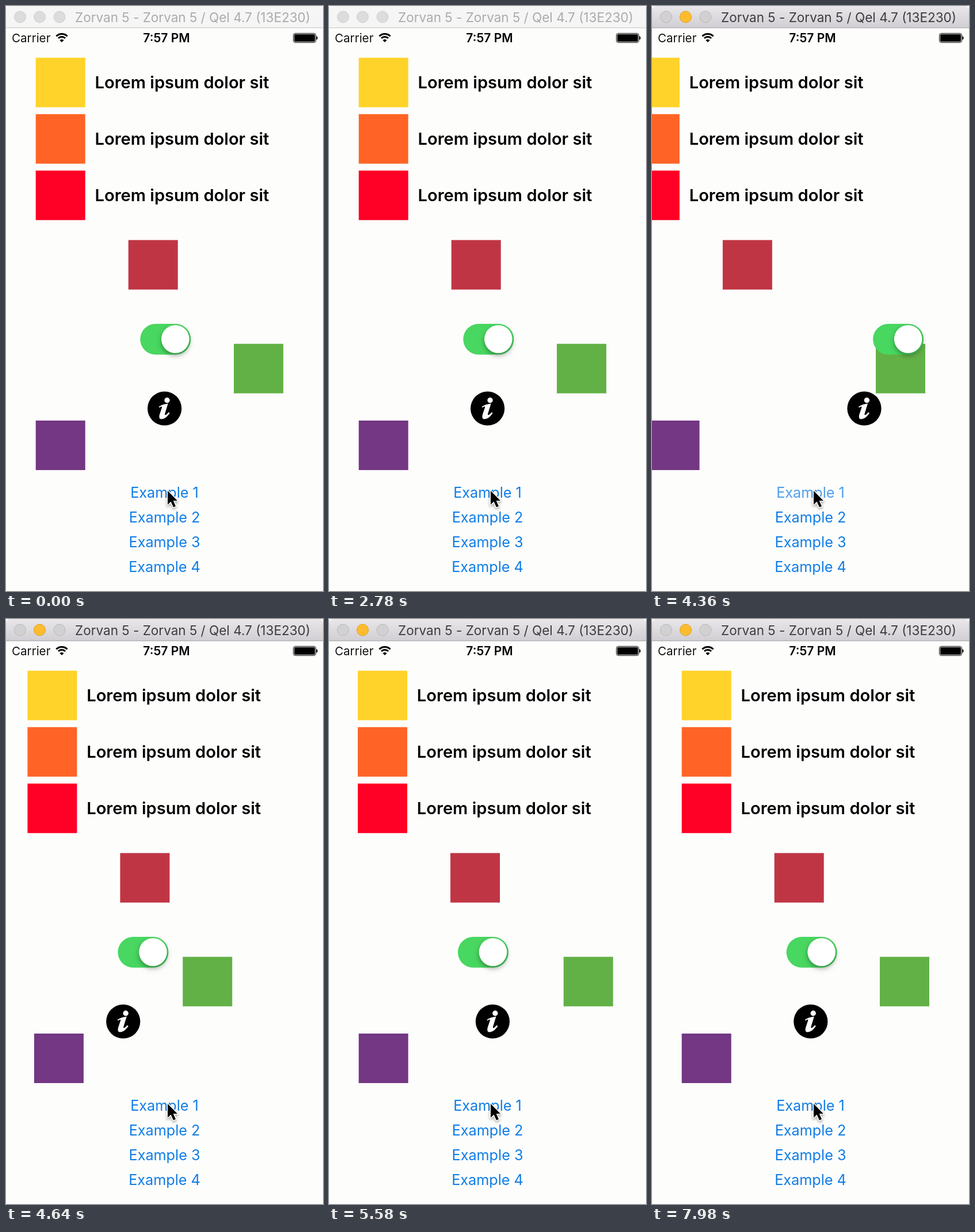
These frames come from a looping animation (551x1016 px, 8000 ms). An HTML page with a canvas:

```html
<!DOCTYPE html>
<html lang="en">
<head>
<meta charset="utf-8">
<style>
html, body { margin: 0; width: 100%; height: 100%; overflow: hidden; background: #fdfdfc; }
canvas { display: block; }
</style>
</head>
<body>
<canvas id="stage" width="551" height="1016"></canvas>
<script>
const ctx = document.getElementById('stage').getContext('2d');
const W = 551, H = 1016, LOOP = 8000;
const PRESS = 3750, RELEASE = 3890;
const FONT = 'Inter, "Open Sans", sans-serif';
const TAU = Math.PI * 2;

// Damped springs: start in ms, angular speed per second, damping ratio.
const springs = {
  rows: { start: 3892, speed: 6.06, damping: 0.5 },
  purple: { start: 3945, speed: 6.9, damping: 0.59 },
  green: { start: 3892, speed: 4.09, damping: 0.5 },
  toggle: { start: 3911, speed: 2.98, damping: 0.5 },
  info: { start: 3905, speed: 3.33, damping: 0.497 }
};

const clamp = v => Math.max(0, Math.min(1, v));
const smooth = v => v * v * (3 - 2 * v);

// Evenly spaced moments are shown for 20, 20 and 100 ms in turn.
function shownTime(t) {
  const u = t - 120;
  const cycle = Math.floor(u / 140);
  const rest = u - cycle * 140;
  const step = rest < 20 ? 0 : rest < 40 ? 1 : 2;
  return 120 + (cycle + step / 3) * 140;
}

function offset({ start, speed, damping }, t) {
  if (t < RELEASE) return 0;
  const a = Math.max(0, t - start) / 1000 * speed;
  const k = damping / Math.sqrt(1 - damping * damping);
  return W * Math.exp(-k * a) * (Math.cos(a) + k * Math.sin(a));
}

function text(str, x, y, size, color, weight = 400, align = 'left') {
  ctx.font = `${weight} ${size}px ${FONT}`;
  ctx.textAlign = align;
  ctx.fillStyle = color;
  ctx.fillText(str, x, y);
}

function disc(x, y, r, fill, stroke) {
  ctx.beginPath();
  ctx.arc(x, y, r, 0, TAU);
  ctx.fillStyle = fill;
  ctx.fill();
  if (stroke) {
    ctx.strokeStyle = stroke;
    ctx.lineWidth = 1;
    ctx.stroke();
  }
}

function pill(x, y, w, h, r) {
  ctx.beginPath();
  ctx.roundRect(x, y, w, h, r);
}

function square(x, y, color) {
  ctx.fillStyle = color;
  ctx.fillRect(x, y, 86, 86);
}

function shadow(color, blur, y) {
  ctx.shadowColor = color;
  ctx.shadowBlur = blur;
  ctx.shadowOffsetY = y;
}

function titleBar(active) {
  const fill = ctx.createLinearGradient(0, 0, 0, 37);
  fill.addColorStop(0, active ? '#e9e7ea' : '#f6f6f6');
  fill.addColorStop(1, active ? '#d1cfd3' : '#f5f5f5');
  ctx.fillStyle = fill;
  pill(0, 0, W, 38, [8, 8, 0, 0]);
  ctx.fill();
  ctx.fillStyle = active ? '#b3b1b5' : '#d5d5d5';
  ctx.fillRect(0, 37, W, 1.5);
  const idle = active ? ['#d2d1d2', '#b9b8b9'] : ['#dcdcdc', '#cecece'];
  [24.5, 58.5, 93].forEach((x, i) => {
    const [inside, edge] = active && i === 1 ? ['#fdbc2e', '#dfa023'] : idle;
    disc(x, 19, 10, inside, edge);
  });
  text('Zorvan 5 - Zorvan 5 / Qel 4.7 (13E230)', 324.5, 27.5, 22.5,
    active ? '#3d3c3e' : '#ababab', 400, 'center');
}

function statusBar() {
  text('Carrier', 10, 63, 20.6, '#111');
  text('7:57 PM', 279, 63, 21, '#000', 600, 'center');
  ctx.strokeStyle = '#000';
  ctx.lineWidth = 3;
  for (const r of [8.5, 13.5]) {
    ctx.beginPath();
    ctx.arc(97, 62, r, -Math.PI * 0.75, -Math.PI * 0.25);
    ctx.stroke();
  }
  ctx.fillStyle = '#000';
  ctx.beginPath();
  ctx.moveTo(97, 63);
  ctx.arc(97, 63, 5, -Math.PI * 0.75, -Math.PI * 0.25);
  ctx.fill();
  ctx.lineWidth = 1;
  pill(499.5, 47.5, 39, 16, 3.5);
  ctx.stroke();
  pill(501, 49, 36, 13, 2);
  ctx.fill();
  pill(539.5, 52.5, 2, 6, [0, 2, 2, 0]);
  ctx.fill();
}

function toggle(x) {
  ctx.fillStyle = '#48d760';
  pill(x, 552, 88, 53.5, 27);
  ctx.fill();
  ctx.save();
  shadow('rgba(0,0,0,.35)', 8, 4);
  disc(x + 61, 578.5, 24.3, '#fff');
  ctx.restore();
}

const letterI = new Path2D('M-10-3 C-6-6 0-8 6-8.5 L.5 9.5 C0 13 3.5 11 7 6.5 L9 8 ' +
  'C4.5 15-1 18.5-5.5 18.5 C-10 18.5-9.5 13.5-8.5 10 L-4.5-2 C-4-4.5-7-3-9-1.5Z');

function infoIcon(x) {
  ctx.save();
  ctx.translate(x, 699);
  disc(0, 0, 29.6, '#000');
  disc(4.4, -14.2, 4.7, '#fff');
  ctx.fill(letterI);
  ctx.restore();
}

function links(t) {
  const fade = t < PRESS ? 1 : t < RELEASE ? 0.2
    : 0.2 + 0.8 * smooth(clamp((t - RELEASE) / 850));
  for (let i = 1; i <= 4; i++) {
    ctx.globalAlpha = i === 1 ? fade : 1;
    text(`Example ${i}`, 275.5, 810.5 + 43 * i, 25.2, '#107de6', 400, 'center');
  }
  ctx.globalAlpha = 1;
}

function clickMark(t) {
  if (t < PRESS || t > 4140) return;
  const p = clamp((t - RELEASE) / 250);
  ctx.save();
  if (p > 0) {
    ctx.globalAlpha = 1 - p;
    shadow('rgba(60,30,60,.35)', 5, 1);
    ctx.strokeStyle = '#f0a4ea';
    ctx.lineWidth = 6;
    ctx.beginPath();
    ctx.arc(280, 843, 10 + 74 * p, 0, TAU);
    ctx.stroke();
  }
  ctx.globalAlpha = 1 - clamp((t - 4040) / 100);
  shadow('rgba(0,0,0,.3)', 3, 1);
  disc(280, 843, 9.5, '#e448e0', '#96609a');
  ctx.restore();
}

const arrow = new Path2D('M0 0 V24 L5.5 18.8 L10 28.5 L14 26.7 L9.7 17.2 H17Z');

function cursor() {
  ctx.save();
  ctx.translate(281, 842);
  shadow('rgba(0,0,0,.4)', 4, 2);
  ctx.strokeStyle = '#fff';
  ctx.lineWidth = 3;
  ctx.lineJoin = 'round';
  ctx.stroke(arrow);
  ctx.shadowColor = 'transparent';
  ctx.fillStyle = '#000';
  ctx.fill(arrow);
  ctx.restore();
}

function draw(t) {
  ctx.fillStyle = '#fdfdfc';
  ctx.fillRect(0, 0, W, H);
  titleBar(t >= PRESS);
  statusBar();

  const rows = offset(springs.rows, t);
  ['#ffd329', '#ff6426', '#ff0026'].forEach((color, i) => {
    square(51.7 + rows, 89.8 + 98 * i, color);
    text('Lorem ipsum dolor sit', 154.5 + rows, 143 + 98 * i, 29.1, '#000', 600);
  });
  square(212.7 + rows, 406.5, '#c03544');
  square(51.7 + offset(springs.purple, t), 720, '#733783');
  square(396 + offset(springs.green, t), 586.7, '#62b146');
  toggle(233.3 + offset(springs.toggle, t));
  infoIcon(275.6 + offset(springs.info, t));

  links(t);
  clickMark(t);
  cursor();
}

const begin = performance.now();
function tick() {
  draw(shownTime((performance.now() - begin) % LOOP));
  requestAnimationFrame(tick);
}
tick();
</script>
</body>
</html>
```
